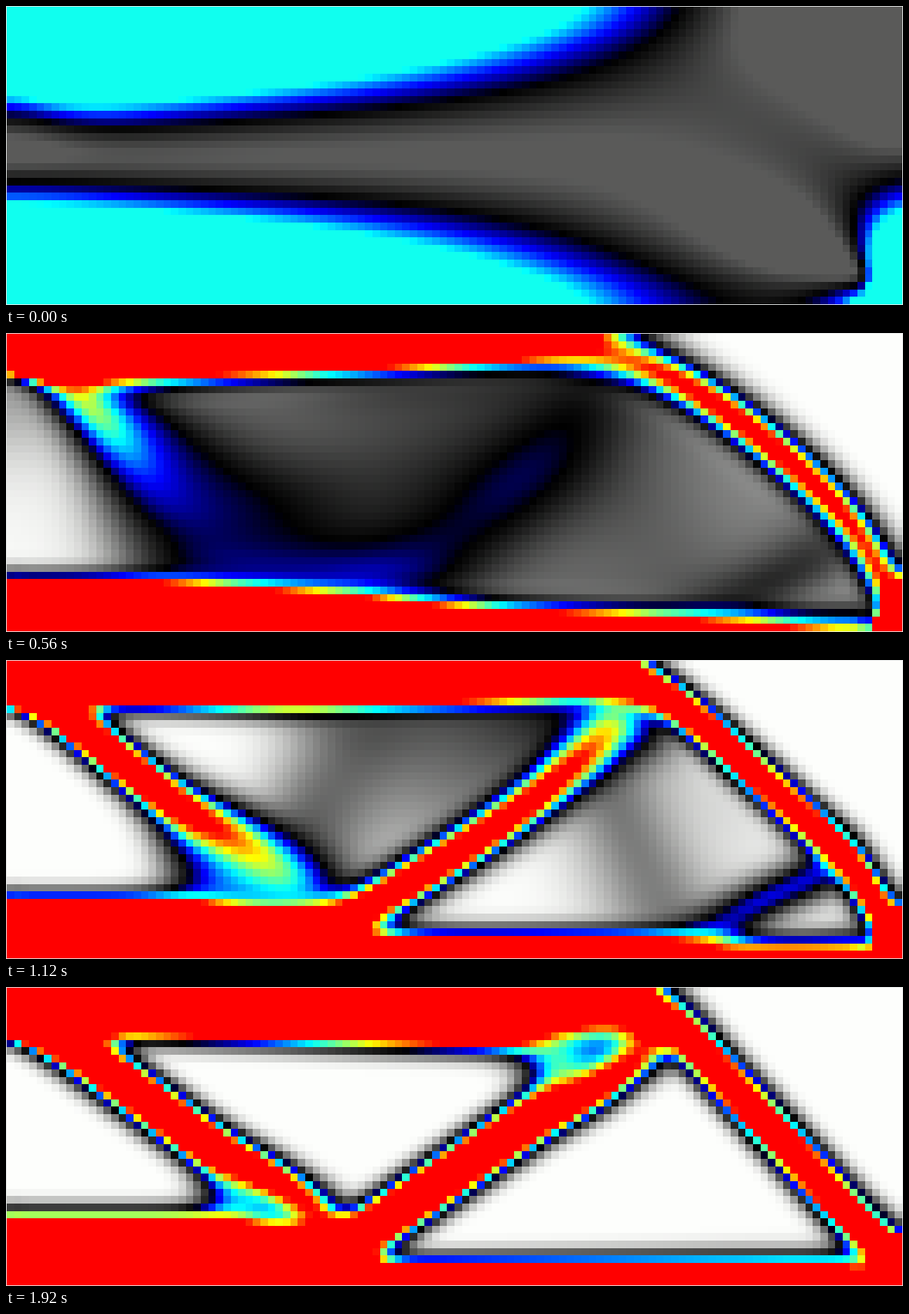
These frames come from a looping animation (1280x428 px, 2000 ms). An HTML page with a canvas:

```html
<!DOCTYPE html>
<html lang="en">
<head>
<meta charset="utf-8">
<title>Beam topology optimisation</title>
<style>
  html, body { margin: 0; width: 100%; height: 100%; overflow: hidden; background: #fff; }
  canvas { display: block; width: 100vw; height: 100vh; }
</style>
</head>
<body>
<canvas id="stage" width="1280" height="428"></canvas>
<script>
// Half of a simply supported beam: load at top left, roller at bottom right.
const NX = 120, NY = 40, CELLS = NX * NY;
const VOLUME = 0.5, RADIUS = 3.5, MOVE = 0.2, XMIN = 0.001, NU = 0.3;
const STEPS = 25, STEP_MS = 80;

const DOFS = 2 * (NX + 1) * (NY + 1);
const BAND = 2 * (NY + 2) + 1, WIDTH = BAND + 1;
const K = new Float64Array(DOFS * WIDTH);
const u = new Float64Array(DOFS);

// Stiffness of a bilinear square element in plane stress
const coef = [
  1 / 2 - NU / 6, 1 / 8 + NU / 8, -1 / 4 - NU / 12, -1 / 8 + 3 * NU / 8,
  -1 / 4 + NU / 12, -1 / 8 - NU / 8, NU / 6, 1 / 8 - 3 * NU / 8
].map(v => v / (1 - NU * NU));
const KE = ['12345678', '21876543', '38167452', '47618325',
            '56781234', '65432187', '74523816', '83254761']
  .map(row => [...row].map(d => coef[d - 1]));

const fixed = new Uint8Array(DOFS);
for (let j = 0; j <= NY; j++) fixed[2 * j] = 1;
fixed[DOFS - 1] = 1;

function elementDofs(e) {
  const a = 2 * ((NY + 1) * Math.floor(e / NY) + e % NY);
  const b = a + 2 * (NY + 1);
  return [a, a + 1, b, b + 1, b + 2, b + 3, a + 2, a + 3];
}
const dofs = Array.from({ length: CELLS }, (_, e) => elementDofs(e));

function assemble(x) {
  K.fill(0);
  for (let e = 0; e < CELLS; e++) {
    const d = dofs[e], s = x[e] ** 3;
    for (let a = 0; a < 8; a++) {
      if (fixed[d[a]]) continue;
      for (let b = 0; b < 8; b++) {
        if (d[b] <= d[a] && !fixed[d[b]]) K[d[a] * WIDTH + BAND + d[b] - d[a]] += s * KE[a][b];
      }
    }
  }
  for (let i = 0; i < DOFS; i++) if (fixed[i]) K[i * WIDTH + BAND] = 1;
}

// Banded Cholesky factorisation followed by both substitutions
function solve() {
  u.fill(0);
  u[1] = -1;
  for (let i = 0; i < DOFS; i++) {
    const lo = Math.max(0, i - BAND), ri = i * WIDTH + BAND - i;
    for (let j = lo; j <= i; j++) {
      const rj = j * WIDTH + BAND - j;
      let s = K[ri + j];
      for (let k = lo; k < j; k++) s -= K[ri + k] * K[rj + k];
      K[ri + j] = j < i ? s / K[rj + j] : Math.sqrt(s);
    }
    let f = u[i];
    for (let k = lo; k < i; k++) f -= K[ri + k] * u[k];
    u[i] = f / K[ri + i];
  }
  for (let i = DOFS - 1; i >= 0; i--) {
    const lo = Math.max(0, i - BAND), ri = i * WIDTH + BAND - i;
    const v = u[i] /= K[ri + i];
    for (let k = lo; k < i; k++) u[k] -= K[ri + k] * v;
  }
}

function gains(x) {
  const g = new Float64Array(CELLS);
  for (let e = 0; e < CELLS; e++) {
    const d = dofs[e];
    let energy = 0;
    for (let a = 0; a < 8; a++) {
      for (let b = 0; b < 8; b++) energy += u[d[a]] * KE[a][b] * u[d[b]];
    }
    g[e] = 3 * x[e] ** 2 * energy;
  }
  return g;
}

// Cone-weighted average of the gains
function smooth(x, g) {
  const out = new Float64Array(CELLS), r = Math.floor(RADIUS);
  for (let i = 0; i < NX; i++) {
    for (let j = 0; j < NY; j++) {
      let sum = 0, total = 0;
      for (let p = Math.max(0, i - r); p <= Math.min(NX - 1, i + r); p++) {
        for (let q = Math.max(0, j - r); q <= Math.min(NY - 1, j + r); q++) {
          const w = Math.max(0, RADIUS - Math.hypot(p - i, q - j)), e = p * NY + q;
          total += w;
          sum += w * x[e] * g[e];
        }
      }
      out[i * NY + j] = sum / (total * x[i * NY + j]);
    }
  }
  return out;
}

// Optimality criteria update; the multiplier keeps the volume constant
function update(x, g) {
  let lo = 1e-9, hi = 1e9, next;
  while (hi / lo > 1.00001) {
    const mid = Math.sqrt(lo * hi);
    let sum = 0;
    next = x.map((v, e) => {
      const wish = v * Math.sqrt(Math.max(0, g[e]) / mid);
      const n = Math.max(XMIN, v - MOVE, Math.min(1, v + MOVE, wish));
      sum += n;
      return n;
    });
    if (sum > VOLUME * CELLS) lo = mid; else hi = mid;
  }
  return next;
}

function optimise() {
  const designs = [];
  let x = new Float64Array(CELLS).fill(VOLUME);
  for (let n = 0; n < STEPS; n++) {
    assemble(x);
    solve();
    x = update(x, smooth(x, gains(x)));
    designs.push(x);
  }
  return designs;
}

const stops = [
  [0, 254, 255, 253], [0.464, 0, 0, 0], [0.578, 0, 0, 255],
  [0.693, 0, 255, 255], [0.807, 255, 255, 0], [0.921, 255, 0, 0], [1.01, 255, 0, 0]
];
function colour(v) {
  const n = stops.findIndex(s => s[0] > v), a = stops[n - 1], b = stops[n];
  const t = (v - a[0]) / (b[0] - a[0]);
  const mix = c => Math.round(a[c] + (b[c] - a[c]) * t);
  return `rgb(${mix(1)},${mix(2)},${mix(3)})`;
}

const ctx = document.getElementById('stage').getContext('2d');
const edgeX = i => 1 + Math.round(i * 1278 / NX);
const edgeY = j => 1 + Math.round(j * 426 / NY);

function draw(x) {
  ctx.fillStyle = '#e6e9e8';
  ctx.fillRect(0, 0, 1280, 428);
  for (let i = 0; i < NX; i++) {
    for (let j = 0; j < NY; j++) {
      ctx.fillStyle = colour(x[i * NY + j]);
      ctx.fillRect(edgeX(i), edgeY(j), edgeX(i + 1) - edgeX(i), edgeY(j + 1) - edgeY(j));
    }
  }
}

const designs = optimise();
const start = performance.now();
let shown = -1;
function tick() {
  const n = Math.floor((performance.now() - start) / STEP_MS) % STEPS;
  if (n !== shown) draw(designs[shown = n]);
  requestAnimationFrame(tick);
}
tick();
</script>
</body>
</html>
```
